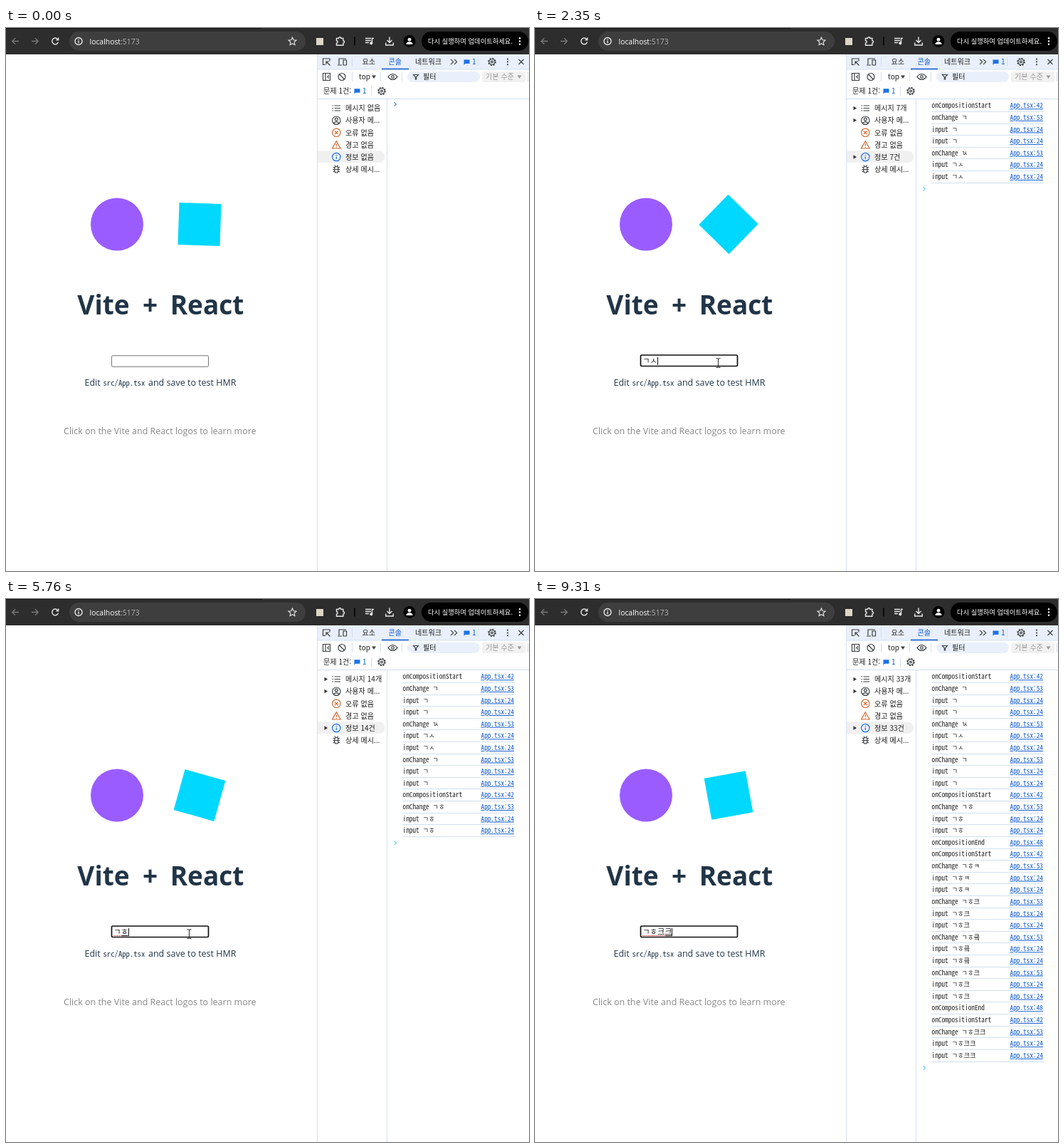
These frames come from a looping animation (735x762 px, 9380 ms). An HTML page:

```html
<!DOCTYPE html>
<html lang="ko">
<head>
<meta charset="utf-8">
<title>Vite + React</title>
<style>
  html, body { margin: 0; width: 100%; height: 100%; overflow: hidden; background: #fff; }
  svg { display: block; }
  text { white-space: pre; }
  .ui { font: 10.1px "Noto Sans CJK KR", "Noto Sans CJK", "Noto Sans", sans-serif; fill: #1f1f1f; }
  .page { font: 12.5px "Open Sans", "Noto Sans", sans-serif; fill: #213547; }
  .mono { font: 9.3px "Noto Sans Mono CJK KR", "Noto Sans Mono", monospace; fill: #1f1f1f; }
  .title { font-size: 37px; font-weight: 700; text-anchor: middle; }
  .link { fill: #0b57d0; text-decoration: underline; }
  .icon { fill: none; stroke: #3c4043; stroke-width: 1.2; }
  .light { fill: none; stroke: #e8e8e8; stroke-width: 1.4; }
  .rule { stroke: #d3dfef; fill: none; }
</style>
</head>
<body>
<svg width="735" height="762" viewBox="0 0 735 762" xmlns="http://www.w3.org/2000/svg">
  <defs>
    <g id="gear" class="icon">
      <circle r="5" stroke-width="1.6" stroke-dasharray="1.93 2"/><circle r="4"/><circle r="1.4"/>
    </g>
    <path id="note" d="M-4-3.5h8v5.500h-6l-2 1.700z" fill="#1a73e8"/>
    <path id="arrow" d="M0 0v13l3-2.700 2 4.600 2.200-1-2-4.400h4.300z" fill="#fff" stroke="#000" stroke-width=".9"/>
    <path id="ibeam" d="M-3-6.500q3 0 3 1.500v10q0 1.500-3 1.500M3-6.500q-3 0-3 1.500M0 5q0 1.500 3 1.500" fill="none" stroke="#333" stroke-width="1.100"/>
  </defs>

  <!-- Browser bar -->
  <rect width="735" height="37" fill="#2d2d2d"/>
  <rect width="360" height="1" fill="#111"/>
  <rect x="89" y="5" width="332" height="27" rx="13.500" fill="#3e3e3e"/>
  <g class="light">
    <path d="M18 18.500h-9m4-4.200l-4.200 4.200 4.200 4.200M36 18.500h9m-4-4.200l4.200 4.200-4.200 4.200" stroke="#777"/>
    <path d="M72.800 16a4.400 4.400 0 1 0 .6 3.600M73.600 13.500v3.200h-3.200"/>
    <circle cx="102" cy="18.500" r="5"/><path d="M102 17.800v3.400M102 15.400v1.300"/>
    <path d="M402.500 13.200l1.600 3.600 3.900.4-2.900 2.600.8 3.900-3.400-2-3.400 2 .8-3.900-2.900-2.600 3.900-.4z" stroke-width="1.100"/>
    <path d="M464.500 14.500h3a1.700 1.700 0 0 1 3.400 0h3v3.300a1.700 1.700 0 0 1 0 3.400v3h-9.400v-3a1.700 1.700 0 0 0 0-3.400z"/>
    <path d="M505 14.500h8M505 17.500h8M505 20.500h5M514.500 21v-6.500h2.500"/><circle cx="513.300" cy="21.300" r="1.400" fill="#e8e8e8"/>
    <path d="M539 12.500v8m-3.500-3.500l3.500 3.500 3.500-3.500M533.700 20.500v3.500h10.600v-3.500"/>
  </g>
  <rect x="436" y="14" width="10" height="10" fill="#ddd6c6"/>
  <path d="M490 12.500v12" stroke="#000" stroke-width="1.500"/>
  <circle cx="567" cy="18.500" r="8.500" fill="#000"/>
  <circle cx="567" cy="16.200" r="2.400" fill="#fff"/><path d="M562.500 23q0-3.700 4.500-3.700t4.500 3.700z" fill="#fff"/>
  <rect x="584" y="5" width="150" height="27" rx="13.500" fill="#000"/>
  <g fill="#fff"><circle cx="722" cy="14.300" r="1.200"/><circle cx="722" cy="18.500" r="1.200"/><circle cx="722" cy="22.700" r="1.200"/></g>
  <text class="page" x="117.500" y="22.500" style="font-size:10.400px;fill:#fff">localhost<tspan fill="#b5b5b5">:5173</tspan></text>
  <text class="ui" x="593" y="22" style="font-size:9.300px;font-weight:500;fill:#fff">다시 실행하여 업데이트하세요.</text>

  <!-- Page -->
  <circle cx="156" cy="275.500" r="37" fill="#9a5cff"/>
  <rect id="spinner" x="-29.500" y="-29.500" width="59" height="59" fill="#00d8ff"/>
  <g class="page">
    <text class="title" x="137" y="402">Vite</text>
    <text class="title" x="202.500" y="402">+</text>
    <text class="title" x="282.500" y="402">React</text>
    <text x="110.500" y="502">Edit</text>
    <text class="mono" x="136.500" y="501.500" style="font-size:10.700px;fill:#213547">src/App.tsx</text>
    <text x="200" y="502">and save to test HMR</text>
    <text x="81" y="570" style="fill:#888">Click on the Vite and React logos to learn more</text>
  </g>
  <rect id="field" x="148.500" width="136" height="15.500" rx="1.500" fill="#fff"/>
  <text id="typed" class="ui" x="151.300" y="471.300" style="font-size:11.200px"></text>
  <path id="squiggle" fill="none" stroke="#e33" stroke-width="1.100" stroke-dasharray="1.700 1"/>
  <path id="composing" stroke="#111"/>
  <path id="caret" stroke="#111"/>

  <!-- Developer tools -->
  <rect x="438" y="37" width="297" height="21" fill="#e9f0fb"/>
  <path class="rule" d="M437.500 37v725M438 58h297M438 99.500h297M535.500 99v663M486.500 41v13M663.500 41v13M486.500 62v13M526.500 62v13M556.500 62v13M733.500 62v13M513.500 82v13"/>
  <path d="M528 57.500h38" stroke="#0b57d0" stroke-width="1.500"/>
  <rect x="564" y="61" width="102" height="15" rx="7.500" fill="#e9f0fb"/>
  <rect x="669" y="61" width="61" height="15" rx="3" fill="#f1f1f1"/>
  <g class="icon">
    <path d="M449 51.500h-3.500v-8.500h9.500v3.500M450 47l5.500 5.500M450 51v-4h4"/>
    <path d="M468 51v-8h10M466 52h6M474 45h4.500v7h-4.500z"/>
    <path d="M625 43.800l3.700 3.700-3.700 3.700M630 43.800l3.700 3.700-3.700 3.700M720.500 44l7 7M727.500 44l-7 7"/>
    <path d="M445.500 63.500h10v10h-10zM449 63.500v10M453.800 66.500l-2 2 2 2"/>
    <circle cx="472" cy="68.500" r="5"/><path d="M468.500 65l7 7"/>
    <path d="M537 68.500q6.500-8 13 0-6.500 8-13 0z"/><circle cx="543.500" cy="68.500" r="1.800"/>
    <path d="M572.500 65.500h7l-2.800 3.200v3.300h-1.400v-3.300z"/>
  </g>
  <g fill="#3c4043">
    <circle cx="705" cy="43.700" r="1.100"/><circle cx="705" cy="47.500" r="1.100"/><circle cx="705" cy="51.300" r="1.100"/>
    <path d="M514 66.500h6l-3 4.500z"/><path d="M718.500 66.500h6l-3 4.500z" fill="#9a9a9a"/>
  </g>
  <use href="#gear" x="683" y="47.500"/><use href="#gear" x="528" y="88.500"/>
  <use href="#note" x="647.500" y="48"/><use href="#note" x="493.500" y="88.700"/>
  <g class="ui">
    <text x="500.500" y="51.200">요소</text>
    <text x="537.500" y="51.200" style="fill:#0b57d0">콘솔</text>
    <text x="575" y="51.200">네트워크</text>
    <text x="655" y="51.200" style="fill:#0b57d0">1</text>
    <text x="496" y="72">top</text>
    <text x="586" y="72">필터</text>
    <text x="674" y="72" style="fill:#9a9a9a">기본 수준</text>
    <text x="446" y="92">문제 1건:</text>
    <text x="501" y="92" style="fill:#0b57d0">1</text>
  </g>

  <!-- Console sidebar -->
  <path d="M438 172.500h86a8.300 8.300 0 0 1 0 16.600h-86z" fill="#f0f0f0"/>
  <path id="expanders" d="M447.500 109.700l4.500 2.800-4.500 2.800zM447.500 126.700l4.500 2.800-4.500 2.800zM447.500 178.200l4.500 2.800-4.500 2.800z" fill="#333"/>
  <g class="icon">
    <path d="M461.500 109h8.500M461.500 112.500h8.500M461.500 116h8.500M458.500 109h1.500M458.500 112.500h1.500M458.500 116h1.500"/>
    <circle cx="464.300" cy="129.700" r="5.700"/><circle cx="464.300" cy="128" r="1.900"/><path d="M460.300 133.500q4-3.600 8 0"/>
    <g stroke="#d0682c">
      <circle cx="464.300" cy="146.800" r="5.700"/><path d="M462 144.500l4.600 4.600M466.600 144.500l-4.600 4.600"/>
      <path d="M464.300 158.700l5.800 10.300h-11.600zM464.300 162.300v3.300M464.300 166.500v1.200"/>
    </g>
    <g stroke="#1a73e8"><circle cx="464.300" cy="181" r="5.700"/><path d="M464.300 180.300v3.600M464.300 177.700v1.300"/></g>
    <path d="M461.800 196.500q0-2 2.500-2t2.500 2v4q0 2.500-2.500 2.500t-2.500-2.500zM459.500 195.500h2.300M459.500 198.500h9.600M459.500 201.500h2.300M466.800 195.500h2.300M466.800 201.500h2.300M462 192.700l1.200 1.800M466.600 192.700l-1.200 1.800"/>
  </g>
  <g class="ui">
    <text id="messages" x="477" y="116.200"></text>
    <text x="477" y="133.300">사용자 메...</text>
    <text x="477" y="150.500">오류 없음</text>
    <text x="477" y="167.600">경고 없음</text>
    <text id="infos" x="477" y="184.700"></text>
    <text x="477" y="201.800">상세 메시...</text>
  </g>

  <!-- Console -->
  <g id="console" class="mono"></g>
  <path id="prompt" d="M-1.500-2.700l3 2.700-3 2.700" fill="none" stroke-width="1.200"/>
  <use id="pointer"/>
</svg>
<script>
const $ = id => document.getElementById(id);
const LOOP = 9380, CLICK = 1030, BLINK = 530;
const ROW = 16.61, FIRST_ROW = 109, FIELD_X = 151, CHAR = 10.3;

const log = [];
const compositionStart = () => log.push(['onCompositionStart', 42]);
const compositionEnd = () => log.push(['onCompositionEnd', 48]);
const change = (value, seen = value) =>
  log.push([`onChange ${value}`, 53], [`input ${seen}`, 24], [`input ${seen}`, 24]);

// Each edit remembers how much of the log exists once it is done.
const edits = [{ at: CLICK, text: '', rows: 0, marked: 0, markAt: 0 }];
const edit = (at, text, marked = 0, markAt = Infinity, composing = true) =>
  edits.push({ at, text, rows: log.length, marked, markAt, composing });

compositionStart(); change('ㄱ');   edit(1750, 'ㄱ');
change('ㄳ', 'ㄱㅅ');               edit(2300, 'ㄱㅅ', 2, 2600, false);
change('ㄱ');                       edit(3250, 'ㄱ');
compositionStart(); change('ㄱㅎ'); edit(3500, 'ㄱㅎ', 1, 4000);
compositionEnd();
compositionStart(); change('ㄱㅎㅋ'); edit(5950, 'ㄱㅎㅋ');
change('ㄱㅎ크');                   edit(6200, 'ㄱㅎ크');
change('ㄱㅎ킄');                   edit(6450, 'ㄱㅎ킄');
change('ㄱㅎ크'); compositionEnd();
compositionStart(); change('ㄱㅎ크크'); edit(6750, 'ㄱㅎ크크', 3, 7400);

$('console').innerHTML = log.map(([message, line], i) => {
  const y = FIRST_ROW + i * ROW;
  return `<g><text x="557.5" y="${y + 3.3}">${message}</text>
    <text class="link" x="667.5" y="${y + 3.3}">App.tsx:${line}</text>
    <path class="rule" d="M557 ${Math.round(y + 8) + .5}H715"/></g>`;
}).join('');
const rows = [...$('console').children];

const show = (node, on) => node.setAttribute('visibility', on ? 'visible' : 'hidden');
const place = (node, x, y, extra = '') => node.setAttribute('transform', `translate(${x} ${y}) ${extra}`);
const charX = n => FIELD_X + n * CHAR;

function glide(t, from, to, start, end) {
  const p = Math.min(1, Math.max(0, (t - start) / (end - start)));
  const eased = p * p * (3 - 2 * p);
  return from.map((v, i) => v + (to[i] - v) * eased);
}

function drawPointer(t) {
  const rest = [257.5, 470];
  const [x, y] = t < 2000 ? glide(t, [374, 552], rest, 350, 960) : glide(t, rest, [458, 648], 7900, 8650);
  const overField = x > 148 && x < 285 && y > 459 && y < 476;
  const overText = x > 110 && x < 323 && y > 490 && y < 505;
  $('pointer').setAttribute('href', overField || overText ? '#ibeam' : '#arrow');
  place($('pointer'), x, y);
  show($('pointer'), t > 350 && t < 8720);
}

function drawField(t, current) {
  const focused = t >= CLICK;
  const { text, marked, markAt, composing, at } = current;
  const field = $('field'), end = charX(text.length);
  field.setAttribute('y', text ? 459 : 459.8);
  field.setAttribute('stroke', focused ? '#101010' : '#767676');
  field.setAttribute('stroke-width', focused ? 1.7 : 1);
  $('typed').textContent = text;
  $('squiggle').setAttribute('d', `M${FIELD_X} 472.5H${charX(marked)}`);
  show($('squiggle'), t >= markAt && marked);
  $('composing').setAttribute('d', `M${charX(text.length - 1) + .7} 472.5H${end}`);
  show($('composing'), composing);
  $('caret').setAttribute('d', `M${Math.round(end) + .5} 462V473`);
  show($('caret'), focused && (t - at) % (2 * BLINK) < BLINK);
}

function drawConsole({ rows: count }) {
  rows.forEach((row, i) => show(row, i < count));
  show($('expanders'), count);
  $('messages').textContent = `메시지 ${count ? count + '개' : '없음'}`;
  $('infos').textContent = `정보 ${count ? count + '건' : '없음'}`;
  place($('prompt'), 547, count ? FIRST_ROW + count * ROW + .6 : 107);
  $('prompt').setAttribute('stroke', count ? '#5cd5fb' : '#5a8de0');
}

function frame(now) {
  const t = now % LOOP;
  const current = edits.filter(e => e.at <= t).pop() || edits[0];
  place($('spinner'), 272, 275.5, `rotate(${2 + t * 360 / 20000})`);
  drawField(t, current);
  drawConsole(current);
  drawPointer(t);
  requestAnimationFrame(frame);
}
frame(0);
</script>
</body>
</html>
```
